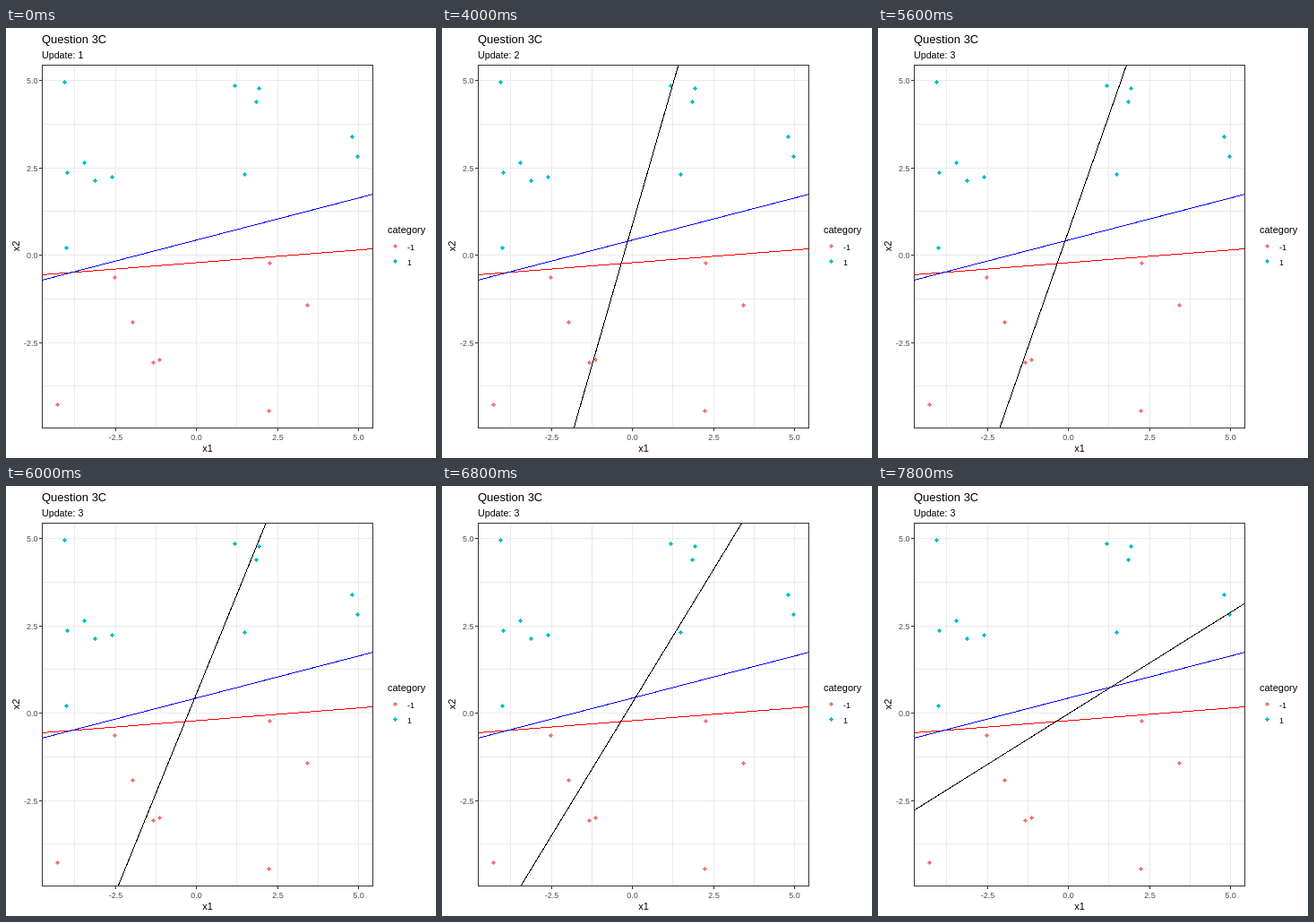
Write an HTML page that moves like this. It is 480x480 px and loops after 8 s.

```html
<!DOCTYPE html>
<html lang="en">
<head>
<meta charset="utf-8">
<title>Question 3C</title>
<style>
  html, body { margin: 0; width: 100%; height: 100%; overflow: hidden; background: #fff; }
  svg { display: block; width: 100vw; height: 100vh; }
  text { font-family: "Liberation Sans", Arial, sans-serif; font-size: 11px; }
  .title { font-size: 13px; }
  .update { font-size: 10.7px; }
  .small { font-size: 9px; }
  .crisp { shape-rendering: crispEdges; fill: none; }
</style>
</head>
<body>
<svg viewBox="0 0 480 480">
  <clipPath id="panel"><rect x="41" y="42" width="368" height="404"/></clipPath>
  <text class="title" x="40" y="17">Question 3C</text>
  <text class="update" id="update" x="40" y="34"></text>
  <g class="crisp" id="grid" stroke="#ebebeb"></g>
  <g class="crisp" id="points"></g>
  <g class="crisp" id="lines" clip-path="url(#panel)"></g>
  <g class="crisp" id="axes" stroke="#333">
    <rect x="40.5" y="41.5" width="369" height="405"/>
  </g>
  <g id="labels"></g>
  <text x="225" y="473" text-anchor="middle">x1</text>
  <text transform="translate(15 243.5) rotate(-90)" text-anchor="middle">x2</text>
  <text x="426" y="229">category</text>
</svg>
<script>
const get = id => document.getElementById(id);

function add(parent, tag, attrs, text = '') {
  const el = document.createElementNS('http://www.w3.org/2000/svg', tag);
  for (const name in attrs) el.setAttribute(name, attrs[name]);
  el.textContent = text;
  get(parent).append(el);
  return el;
}

// Data units to the centre of a pixel
const px = v => Math.floor(212.55 + 36.2 * v) + 0.5;
const py = v => Math.floor(253.7 - 39 * v) + 0.5;

for (let v = -3.75; v <= 5; v += 1.25) {
  const x = px(v), y = py(v);
  add('grid', 'path', { d: `M${x} 42V446M41 ${y}H409` });
  if (v % 2.5) continue;
  add('axes', 'path', { d: `M${x} 447v3M37 ${y}h3` });
  const style = { class: 'small', fill: '#4d4d4d' };
  add('labels', 'text', { ...style, x, y: 460, 'text-anchor': 'middle' }, v.toFixed(1));
  add('labels', 'text', { ...style, x: 35.5, y: y + 3.5, 'text-anchor': 'end' }, v.toFixed(1));
}

// A line by its height at the panel centre (x = 225) and its rise per pixel
const line = (mid, slope) => x => mid - (x - 225) * slope;
const span = f => `M40 ${f(40)}L410 ${f(410)}`;
const truth = line(261, 0.0784);
const fitted = line(233.5, 0.2595);

function dot(x, y, above) {
  const fill = above ? '#00bfc4' : '#f8766d';
  add('points', 'circle', { cx: x + 0.5, cy: y + 0.5, r: 2.1, fill });
}

// Sample points; the side of the true line decides the category
const samples = [
  [57, 420], [65, 60], [67, 245], [68, 161], [87, 150], [99, 170], [118, 166],
  [121, 278], [141, 328], [164, 373], [171, 370], [255, 64], [266, 163], [279, 82],
  [282, 67], [293, 427], [294, 262], [336, 309], [386, 121], [392, 143]
];
for (const [x, y] of samples) dot(x, y, y < truth(x));

for (const [i, name] of ['-1', '1'].entries()) {
  dot(434, 243 + 17 * i, i);
  add('labels', 'text', { class: 'small', x: 448, y: 248 + 17 * i }, name);
}

add('lines', 'path', { d: span(truth), stroke: '#f00' });
add('lines', 'path', { d: span(fitted), stroke: '#00f' });
const boundary = add('lines', 'path', { stroke: '#000' });

function draw(now) {
  const t = now % 8000;
  const step = Math.max(0, Math.floor((t - 5000) / 200));
  get('update').textContent = 'Update: ' + (t < 1000 ? 1 : t < 5200 ? 2 : 3);
  boundary.setAttribute('d', t < 4000 ? '' : span(line(176.5 + 5 * step, 3.472 - 0.2033 * step)));
  requestAnimationFrame(draw);
}
draw(performance.now());
</script>
</body>
</html>
```
